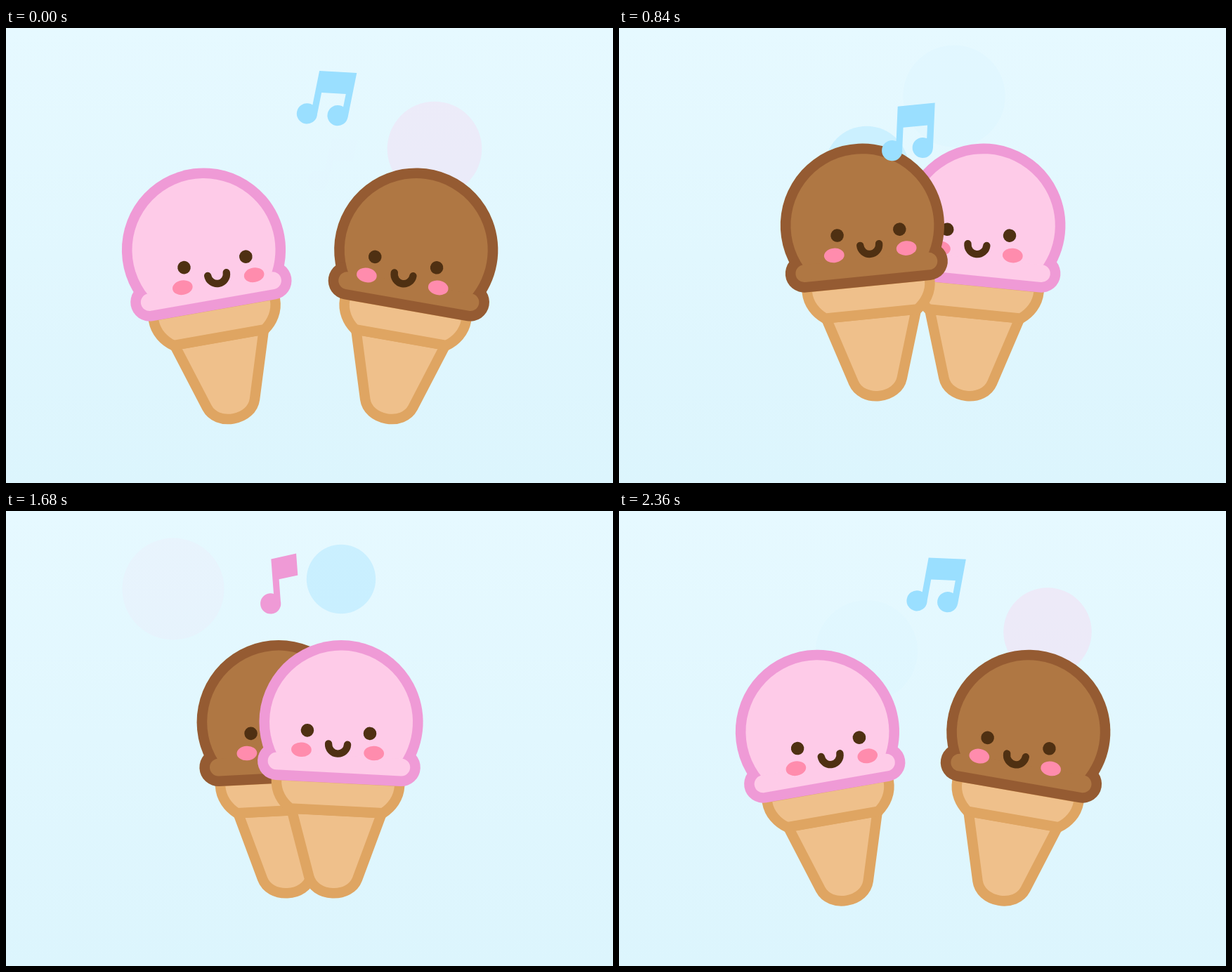
An HTML page with a canvas that plays this animation: 864 by 648 pixels, repeating every 2.4 s.

```html
<!DOCTYPE html>
<html lang="en">
<head>
<meta charset="utf-8">
<title>Dancing ice creams</title>
<style>
  html, body { margin: 0; width: 100%; height: 100%; overflow: hidden; }
  canvas { display: block; }
</style>
</head>
<body>
<canvas id="stage" width="864" height="648"></canvas>
<script>
const ctx = document.getElementById('stage').getContext('2d');
const LOOP = 2400, HALF = 1200, HOP = 600, CENTER = 432.6;
const PINK = { fill: '#fecbe8', edge: '#ef9ad6' };
const BROWN = { fill: '#af7743', edge: '#955b32' };
const CONE = { fill: '#efc08b', edge: '#dfa562' };
const BLUE = '#9adfff', INK = '#4f3012', CHEEK = '#ff8cad';

const cup = new Path2D('M-64.5 126.5 L-34.5 222 C-30 236 -16 244 0 244 C16 244 30 236 34.5 222 L64.5 126.5 Z');
const rim = new Path2D('M-87.7 80 V87 C-87.7 104 -78 118 -66 126.5 H66 C78 118 87.7 104 87.7 87 V80 Z');
const singleNote = new Path2D('M5.3 0 V-63.2 L41.5 -68.4 V-37.5 L14.4 -33.6 V0 Z');
const doubleNote = new Path2D('M5.3 0 V-63.2 L58 -70.7 V-6 H48.7 V-38.2 L14.4 -33.4 V0 Z');

// Each bubble starts 300 ms after the one before it.
const bubbles = [
  [238, 111, PINK.fill], [477, 97, BLUE], [352.5, 199.5, BLUE], [610, 172, PINK.fill]
];

const mod = (a, n) => ((a % n) + n) % n;
const clamp = v => Math.max(0, Math.min(1, v));
const smooth = p => p * p * (3 - 2 * p);
const rad = deg => deg * Math.PI / 180;

const sky = ctx.createLinearGradient(0, 0, 0, 648);
sky.addColorStop(0, '#e6f9ff');
sky.addColorStop(1, '#dcf5fd');

function ellipse(x, y, rx, ry, color) {
  ctx.fillStyle = color;
  ctx.beginPath();
  ctx.ellipse(x, y, rx, ry, 0, 0, 7);
  ctx.fill();
}

function outlined(path) {
  ctx.fillStyle = CONE.fill;
  ctx.strokeStyle = CONE.edge;
  ctx.lineWidth = 14.5;
  ctx.fill(path);
  ctx.stroke(path);
}

// A ball cut off at its lower part, resting on a rounded brim.
function scoop(radius, brim, color) {
  const cut = Math.asin(60 / radius);
  ctx.fillStyle = color;
  ctx.beginPath();
  ctx.arc(0, 0, radius, Math.PI - cut, cut);
  ctx.fill();
  ctx.beginPath();
  ctx.roundRect(-89 - brim, 60 - brim, 178 + 2 * brim, 2 * brim, brim);
  ctx.fill();
}

function face(x, y) {
  ctx.translate(x, y);
  for (const side of [-1, 1]) {
    ellipse(side * 44.6, 0, 9.3, 9.3, INK);
    ellipse(side * 51.7, 27.8, 14.4, 10.3, CHEEK);
  }
  ctx.strokeStyle = INK;
  ctx.lineWidth = 10.4;
  ctx.lineCap = 'round';
  ctx.beginPath();
  ctx.arc(0, 17.5, 13.5, 0, Math.PI);
  ctx.stroke();
}

// Height of the hop, from 0 on the ground to 1 at the top.
const hop = t => smooth(1 - Math.abs(mod(t, HOP) / 300 - 1));

function iceCream(t, sway, flavor) {
  ctx.save();
  ctx.translate(CENTER + 116.4 * sway, 513 - 36.5 * hop(t));
  ctx.rotate(rad(10 * sway));
  ctx.translate(0, -200);
  outlined(cup);
  outlined(rim);
  scoop(116.6, 27, flavor.edge);
  scoop(102, 12.4, flavor.fill);
  face(0.7 - 12 * sway, 20.1 - 11.9 * hop(t - 30));
  ctx.restore();
}

function bubble([x, y, color], index, t) {
  const age = mod(t - 300 * index - 7, HALF);
  if (age > 600) return;
  ctx.globalAlpha = 0.37 * clamp((600 - age) / 400);
  const r = 72.5 * (1 - (1 - clamp(age / 402)) ** 2);
  ellipse(x, y, r, r, color);
  ctx.globalAlpha = 1;
}

function note(path, heads, age, x, y, angle, color) {
  const alpha = clamp(Math.min(age, 720 - age) / 80);
  if (!alpha) return;
  ctx.save();
  ctx.globalAlpha = alpha;
  ctx.translate(x, y);
  ctx.rotate(rad(angle));
  const shape = new Path2D(path);
  for (const [hx, hy] of heads) {
    const head = new Path2D();
    head.arc(hx, hy, 14.6, 0, 7);
    shape.addPath(head);
  }
  ctx.fillStyle = color;
  ctx.fill(shape);
  ctx.restore();
}

function notes(t) {
  const a = mod(t, HALF), d = a - 480;
  note(singleNote, [[0, 0]], a,
    376.8 - 0.0869 * d + 0.000113 * d * d,
    132 - 0.1125 * d + 0.000137 * d * d,
    -4.2 - 0.0369 * d, PINK.edge);
  const b = mod(t - 600, HALF);
  note(doubleNote, [[0, 0], [43.3, -6]], b,
    362.1 + 0.1104 * b, 209.9 - 0.1464 * b, -3.5 + 0.0248 * b, BLUE);
}

function draw(now) {
  const t = mod(now, LOOP);
  const swing = 2 * smooth((t % HALF) / HALF) - 1;
  ctx.fillStyle = sky;
  ctx.fillRect(0, 0, 864, 648);
  bubbles.forEach((b, i) => bubble(b, i, t));
  // The one moving left passes in front.
  const [back, front] = t < HALF ? [PINK, BROWN] : [BROWN, PINK];
  iceCream(t, swing, back);
  iceCream(t, -swing, front);
  notes(t);
  requestAnimationFrame(draw);
}
requestAnimationFrame(draw);
</script>
</body>
</html>
```
